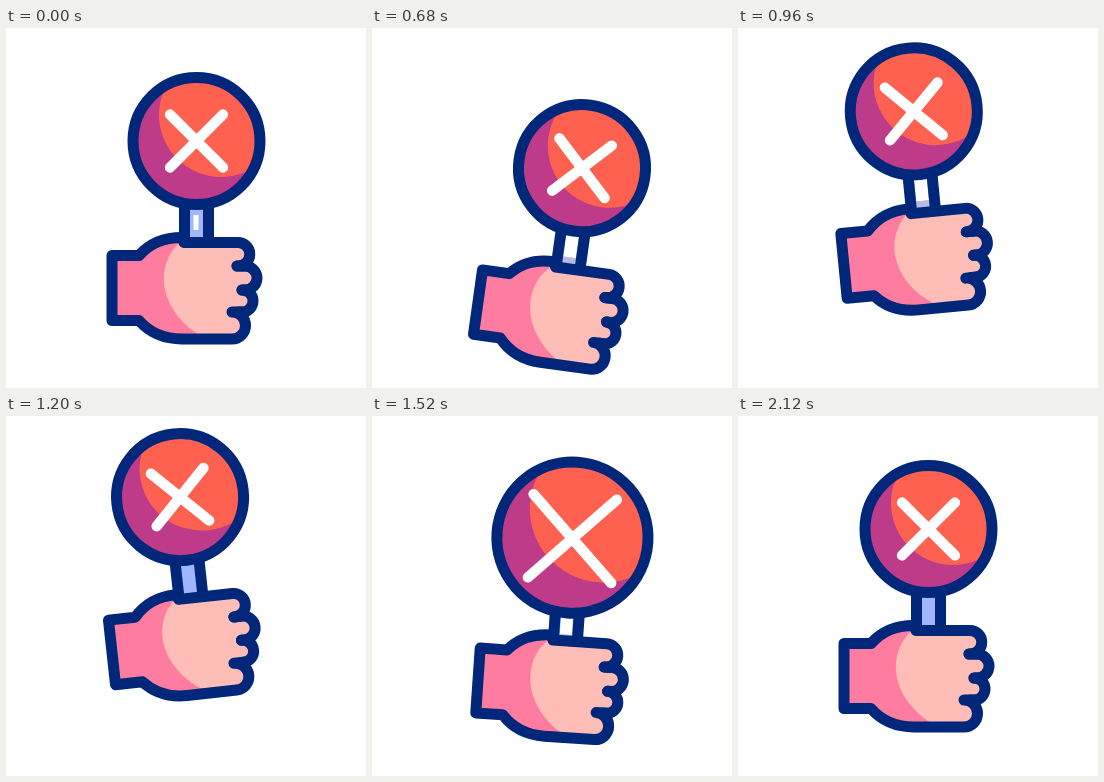
These frames come from a looping animation (360 px wide and 360 px high, 2.16 s). An HTML page with a canvas:

```html
<!DOCTYPE html>
<html lang="en">
<head>
<meta charset="utf-8">
<title>Rejected sign</title>
<style>
  html, body { margin: 0; width: 100%; height: 100%; overflow: hidden; background: #fff; }
  canvas { display: block; width: 360px; height: 360px; }
</style>
</head>
<body>
<canvas id="stage"></canvas>
<script>
const SIZE = 360, LOOP = 2160, STEP = 40;
const NAVY = '#00277a', CORAL = '#ff6150', MAGENTA = '#bd3b88';
const PINK = '#ff7ca1', PEACH = '#ffbdb7', BLUE = '#a0b7ff', WHITE = '#fff';

const canvas = document.getElementById('stage');
const ctx = canvas.getContext('2d');
const dpr = window.devicePixelRatio || 1;
canvas.width = canvas.height = SIZE * dpr;

const wrist = { x: 106, y: 260 };
const disc = { x: 190.5, y: 113, r: 63.5 };

const hand = new Path2D(
  'M106 227.5 H133 C144 215 157 209.5 176 209.5 L178 214.5 H232' +
  'A11.75 11.75 0 0 1 232 238 H231 H239 A12 12 0 0 1 239 262' +
  'H236 A11 11 0 0 1 236 284 H232 H226 A13.5 13.5 0 0 1 226 311' +
  'H176 C156 311 143 304 133 292.5 H106 Z');
const fist = new Path2D('M176 213 C150 232 148 280 196 309 H260 V213 Z');
const grooves = new Path2D('M231 238 H239 M236 262 H240 M232 284 H237');

// Keys: time, tilt in degrees, vertical shift
const swing = [
  [168, 0, 0], [640, 8.2, 14.8], [1080, -8, -28.5], [1520, 3.9, 4.5], [2110, 0, 0]
];
// Keys: time, growth
const growth = [[1240, 0], [1520, 1], [1840, 1], [2110, 0]];

const ease = u => u < 0.5 ? 2 * u * u : 1 - 2 * (1 - u) * (1 - u);

function sample(keys, t) {
  if (t <= keys[0][0]) return keys[0].slice(1);
  for (let i = 1; i < keys.length; i++) {
    const a = keys[i - 1], b = keys[i];
    if (t < b[0]) {
      const u = ease((t - a[0]) / (b[0] - a[0]));
      return a.slice(1).map((v, k) => v + (b[k + 1] - v) * u);
    }
  }
  return keys[keys.length - 1].slice(1);
}

function box(color, x, y, w, h) {
  ctx.fillStyle = color;
  ctx.fillRect(x, y, w, h);
}

function circle(x, y, r) {
  ctx.beginPath();
  ctx.arc(x, y, r, 0, Math.PI * 2);
}

function line(x1, y1, x2, y2) {
  ctx.beginPath();
  ctx.moveTo(x1, y1);
  ctx.lineTo(x2, y2);
  ctx.stroke();
}

function drawHandle(t) {
  box(BLUE, 178.5, 165, 24, 49);
  if (t < 200) {
    box(WHITE, 187.5, 187, 5, 15);
  } else if (t < 1000) {
    box(WHITE, 184, 165, 13, 38);
    box('#b9b9e2', 184, 203, 13, 6);
  } else if (t >= 1320 && t < 1900) {
    box(WHITE, 184.5, 165, 12, 43);
  }
  ctx.strokeStyle = NAVY;
  ctx.lineWidth = 11;
  line(178.5, 165, 178.5, 214);
  line(202.5, 165, 202.5, 214);
}

function drawDisc(grow) {
  const k = 1 + 0.19 * grow;
  const y = disc.y - 2 * grow;
  const r = disc.r * k;
  ctx.save();
  circle(disc.x, y, r);
  ctx.clip();
  box(MAGENTA, disc.x - r, y - r, 2 * r, 2 * r);
  circle(disc.x + 24.5 * k, y - 26 * k, 62 * k);
  ctx.fillStyle = CORAL;
  ctx.fill();
  ctx.restore();

  circle(disc.x, y, r);
  ctx.strokeStyle = NAVY;
  ctx.lineWidth = 11;
  ctx.stroke();

  const arm = 26.4 * (1 + 0.58 * grow);
  const cy = disc.y - grow;
  ctx.strokeStyle = WHITE;
  ctx.lineWidth = 10.5;
  line(disc.x - arm, cy - arm, disc.x + arm, cy + arm);
  line(disc.x - arm, cy + arm, disc.x + arm, cy - arm);
}

function drawHand() {
  ctx.save();
  ctx.clip(hand);
  box(PINK, 100, 200, 160, 120);
  ctx.fillStyle = PEACH;
  ctx.fill(fist);
  ctx.restore();
  ctx.strokeStyle = NAVY;
  ctx.lineWidth = 11;
  ctx.stroke(hand);
  ctx.stroke(grooves);
}

function draw(t) {
  const [tilt, shift] = sample(swing, t);
  const [grow] = sample(growth, t);
  ctx.setTransform(dpr, 0, 0, dpr, 0, 0);
  box(WHITE, 0, 0, SIZE, SIZE);
  ctx.lineCap = ctx.lineJoin = 'round';
  ctx.translate(wrist.x, wrist.y + shift);
  ctx.rotate(tilt * Math.PI / 180);
  ctx.translate(-wrist.x, -wrist.y);
  drawHandle(t);
  drawDisc(grow);
  drawHand();
}

const start = performance.now();
function tick() {
  const t = (performance.now() - start) % LOOP;
  draw(Math.floor(t / STEP) * STEP);
  requestAnimationFrame(tick);
}
tick();
</script>
</body>
</html>
```
